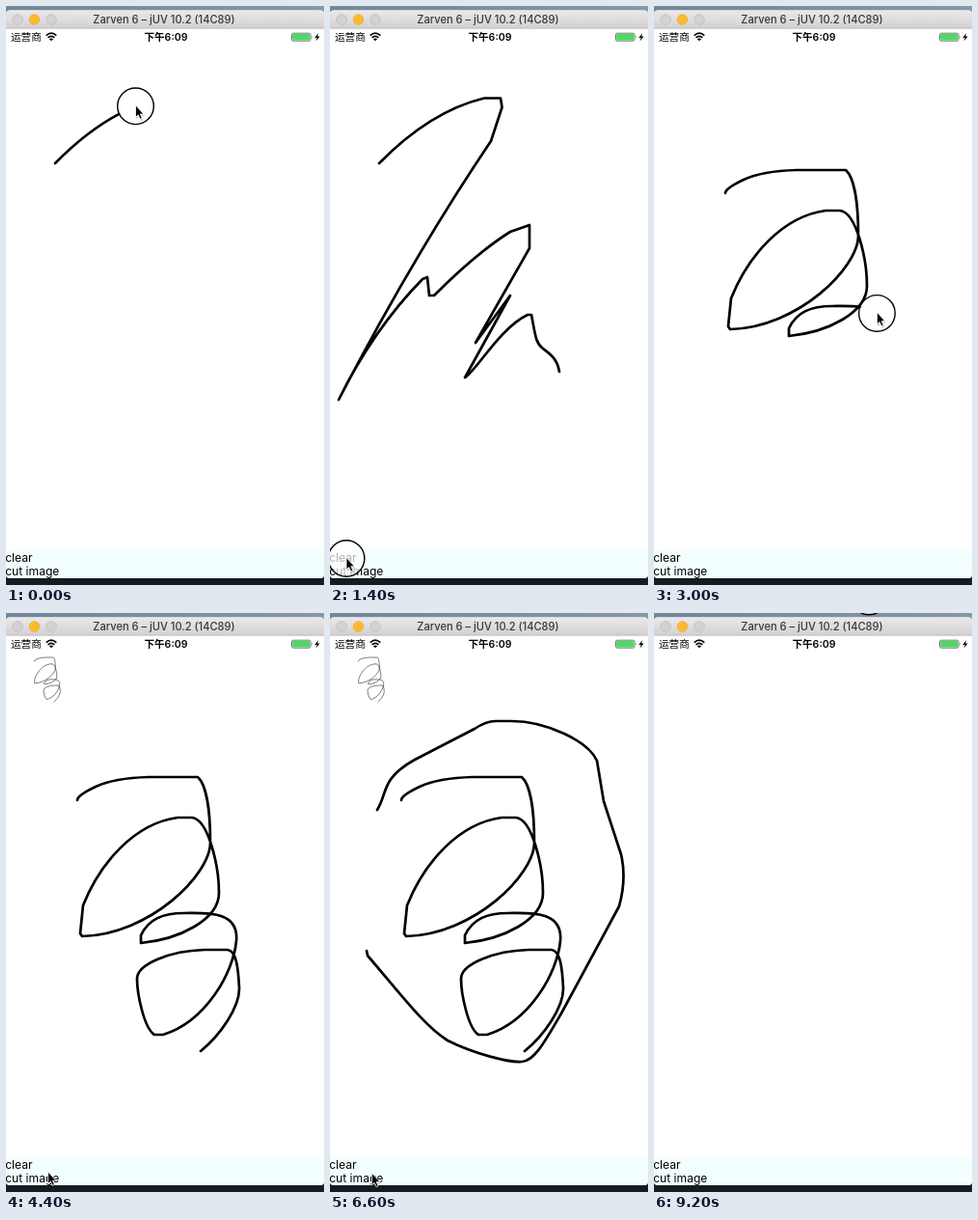
Recreate the animation shown at these times as an HTML page. Size 330x600 px, loop 9400 ms.

```html
<!DOCTYPE html>
<html lang="zh">
<head>
<meta charset="utf-8">
<title>Drawing pad</title>
<style>
  html, body { margin: 0; width: 100%; height: 100%; overflow: hidden; background: #fff; }
  svg { display: block; width: 330px; height: 600px; }
  text { font-family: Inter, "Noto Sans CJK SC", "Noto Sans CJK", sans-serif; fill: #000; }
  .title { font-size: 11.1px; font-weight: 500; fill: #383838; text-anchor: middle; }
  .status { font-size: 10.6px; }
  .clock { font-weight: 600; text-anchor: middle; }
  .button { font-size: 12.1px; }
  .ink { fill: none; stroke: #000; stroke-width: 2.7; stroke-linecap: round; stroke-linejoin: round; }
  .small { stroke-width: 3.2; }
  .arc { fill: none; stroke: #000; stroke-width: 1.7; }
</style>
</head>
<body>
<svg viewBox="0 0 330 600">
  <defs>
    <linearGradient id="bar" x2="0" y2="1">
      <stop stop-color="#ebe9eb"/>
      <stop offset="1" stop-color="#d2d0d2"/>
    </linearGradient>
    <linearGradient id="sky">
      <stop stop-color="#72879a"/>
      <stop offset="1" stop-color="#8797a6"/>
    </linearGradient>

    <path id="zigzag" d="M51 163Q104 109 160 95.5H177L178.5 105L167 140Q86 260 9 408Q45 335 96 283
      L101 281L103 300H108Q152 256 187 234L207 227V251L151 349L187 300L140 385
      C152 378 176 334 205 320H209C213 340 213 349 221 355S236 366 238 379"/>
    <path id="loops" d="M74 194Q74 189 93 180T148 170H199C208 178 212 205 212 238S150 333 79 335
      L77 332L80 303C98 258 134 218 178 212H193C210 214 221 262 221 290S180 338 140 342
      V334C148 317 163 311 185 311S242 308 239 340S208 423 163 437
      H154C143 430 136 394 136 379S170 350 206 349H230C239 350 241 368 242 388S222 438 202 454"/>
    <path id="hull" d="M49 204C60 187 52 172 88 152L150 120Q162 112 172 112H188
      C225 112 268 133 277 153L284 195L302 250Q308 275 300 304L240 415
      C222 446 212 464 199 465S150 457 122 443C98 428 75 397 39 355L38 350"/>
  </defs>

  <rect width="330" height="30" fill="url(#sky)"/>
  <rect y="580" width="330" height="20" fill="#131d21"/>
  <rect y="4.5" width="330" height="588.5" rx="4" fill="#fff"/>
  <path d="M0 23V9Q0 4.5 4 4.5H326Q330 4.5 330 9V23Z" fill="url(#bar)"/>
  <path d="M0 23.2H330" stroke="#b4b2b4" stroke-width=".8"/>
  <g fill="#d3d1d3" stroke="#bcbabc" stroke-width=".7">
    <circle cx="12" cy="14" r="5.3"/>
    <circle cx="29.5" cy="14" r="5.3" fill="#fdb92c" stroke="#eeab28"/>
    <circle cx="47" cy="14" r="5.3"/>
  </g>
  <text class="title" x="164" y="18">Zarven 6 – jUV 10.2 (14C89)</text>

  <text class="status" x="5" y="36">运营商</text>
  <path class="arc" d="M41.7 30.6Q47 25.8 52.3 30.6M43.6 32.8Q47 29.8 50.4 32.8"/>
  <path d="M47 36.2L44.9 34.2Q47 32.6 49.1 34.2Z"/>
  <text class="status clock" x="166" y="36">下午6:09</text>
  <rect x="296.5" y="28.2" width="19.6" height="8" rx="1.6" fill="#fff" stroke="#555" stroke-width=".8"/>
  <rect x="297.2" y="28.9" width="18.2" height="6.6" rx="1" fill="#4cd964"/>
  <path d="M317 30.8Q318.3 32.2 317 33.6Z" fill="#555"/>
  <path d="M324.2 28L320.3 33H322.7L321.6 36.4L325.6 31.4H323.2Z"/>

  <path d="M0 564H330V589Q330 593 326 593H4Q0 593 0 589Z" fill="#f3fffe"/>
  <text class="button" x="-.8" y="576">clear</text>
  <text class="button" x="-.8" y="590.3">cut image</text>

  <g id="pad" class="ink"></g>
  <g id="thumb" class="ink small" transform="translate(17 18.5) scale(.162)"></g>

  <g id="cursor">
    <circle id="touch" r="18.8" fill="#fff" fill-opacity=".7" stroke="#000" stroke-width="1.4"/>
    <path d="M.6 1V14L3.6 11.4L5.4 15.4L7.8 14.4L6 10.4H9.6Z" fill="#000" opacity=".16"/>
    <path d="M0-1V11.5L2.7 9L4.7 13.4L6.7 12.5L4.8 8.2H8.4Z" stroke="#fff" stroke-width=".8"/>
  </g>
</svg>
<script>
const LOOP = 9400, STEP = 200, TOUCH = 19;
const $ = id => document.getElementById(id);

const draw = (from, to, id) => {
  const path = $(id), length = path.getTotalLength();
  return { kind: 'draw', from, to, id, length, at: k => path.getPointAtLength(k * length) };
};
const hold = (kind, from, to, x, y) => ({ kind, from, to, at: () => ({ x, y }) });
const clear = (from, to) => hold('clear', from, to, 17, 572.5);
const cut = (from, to) => hold('cut', from, to, 43.5, 586);

// What the pointer does; between actions it glides to the next one.
const actions = [
  draw(-90, 1020, 'zigzag'),
  clear(1300, 1500),
  draw(1850, 3600, 'loops'),
  cut(4150, 4350),
  draw(5020, 6050, 'hull'),
  cut(6650, 6900),
  clear(7350, 7550),
  hold('rest', 8000, 8200, 94, 323),
  hold('tap', 9100, LOOP, 223, -17)
];

const progress = (a, t) => Math.min(1, (t - a.from) / (a.to - a.from));
const ease = k => k * k * (3 - 2 * k);

function pointer(t) {
  const i = actions.findIndex(a => t < a.to), next = actions[i];
  if (t >= next.from) return next.at(progress(next, t));
  const prev = actions[i - 1], p = prev.at(1), q = next.at(0);
  const k = ease((t - prev.to) / (next.from - prev.to));
  return { x: p.x + (q.x - p.x) * k, y: p.y + (q.y - p.y) * k };
}

const lastDone = (kind, t) => actions.filter(a => a.kind === kind && a.to <= t).pop()?.to ?? -LOOP;

// Strokes since the last clear; a live line stops at the rim of the touch circle.
function ink(t) {
  const wiped = lastDone('clear', t);
  return actions.filter(a => a.kind === 'draw' && a.from <= t && a.to > wiped).map(a => {
    const k = progress(a, t);
    const shown = k < 1 ? Math.max(0, k * a.length - TOUCH) : a.length + 1;
    return `<use href="#${a.id}" stroke-dasharray="${shown} ${a.length + 9}"/>`;
  }).join('');
}

function render(t) {
  const { x, y } = pointer(t);
  $('cursor').setAttribute('transform', `translate(${x} ${y})`);
  const down = actions.some(a => a.kind !== 'rest' && t >= a.from && t < a.to);
  $('touch').style.display = down ? '' : 'none';
  $('pad').innerHTML = ink(t);
  const snap = lastDone('cut', t);
  $('thumb').innerHTML = snap > lastDone('clear', t) ? ink(snap) : '';
}

let current = -1;
function tick() {
  const t = Math.floor(performance.now() % LOOP / STEP) * STEP;
  if (t !== current) render(current = t);
  requestAnimationFrame(tick);
}
tick();
</script>
</body>
</html>
```
